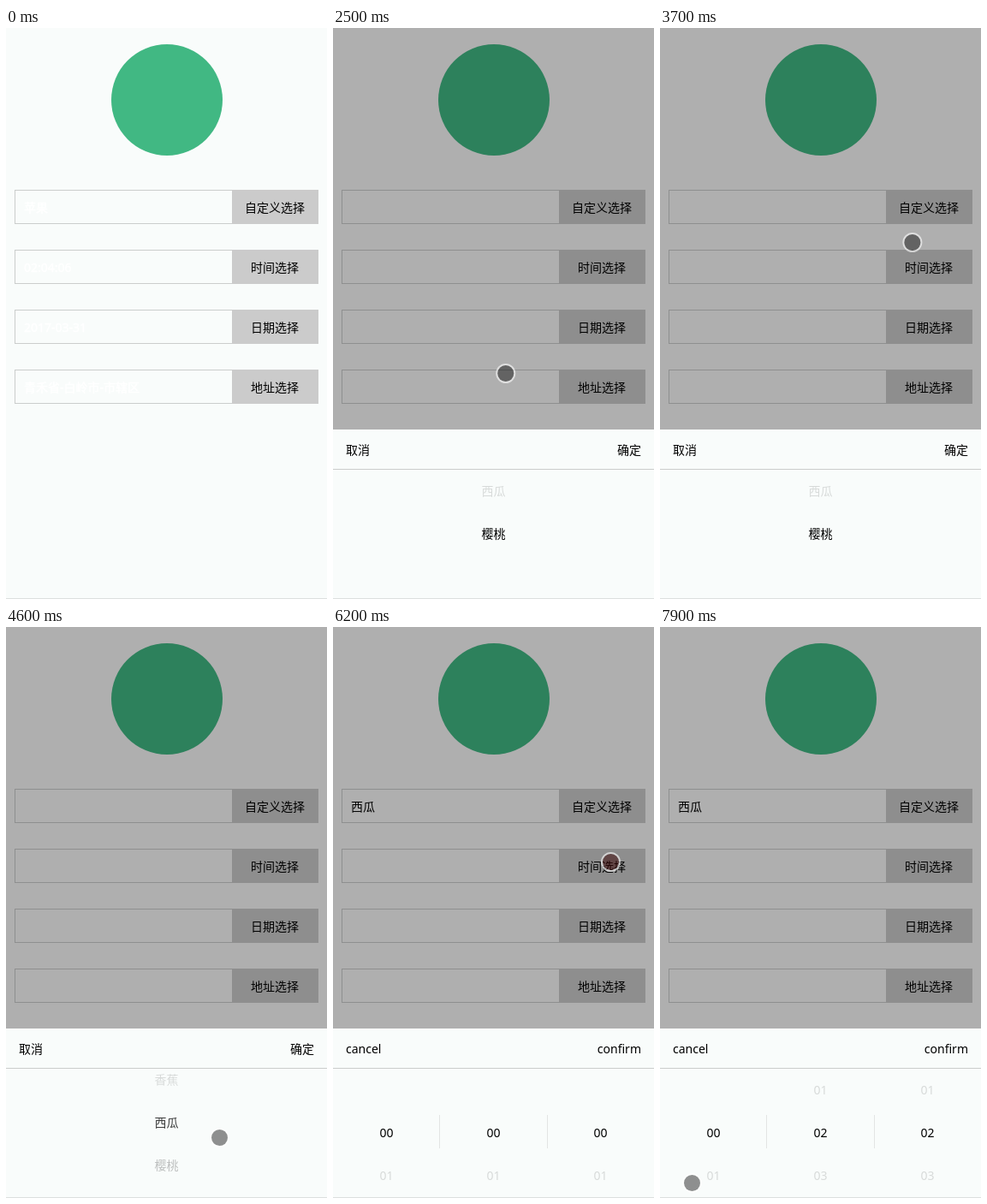
Animation, 375 px wide and 667 px high, one loop 8000 ms. Source, as an HTML page:

```html
<!DOCTYPE html>
<html lang="zh-CN">
<head>
<meta charset="utf-8">
<title>Picker</title>
<style>
  html, body { margin: 0; width: 100%; height: 100%; overflow: hidden; background: #f9fcfb; }
  svg { display: block; width: 375px; height: 667px; }
  text { font: 14px "Noto Sans", "Noto Sans CJK SC", sans-serif; white-space: pre; }
  .mid { text-anchor: middle; }
  .end { text-anchor: end; }
  .old { fill: #fff; stroke: #fff; stroke-width: .5; }
</style>
</head>
<body>
<svg viewBox="0 0 375 667">
  <defs><clipPath id="listArea"><rect y="516" width="375" height="150"/></clipPath></defs>
  <rect width="375" height="667" fill="#f9fcfb"/>
  <rect id="page" width="375" height="469" fill="#fafafa"/>
  <circle cx="188" cy="84" r="65" fill="#41b883"/>
  <g id="rows"></g>
  <g id="popup">
    <rect width="375" height="469" opacity=".3"/>
    <rect y="469" width="375" height="198" fill="#f9fcfb"/>
    <rect y="515" width="375" height="1" fill="#cbcdcc"/>
    <text id="cancel" x="15" y="498"></text>
    <text id="confirm" x="360" y="498" class="end"></text>
    <g id="fruitPicker" clip-path="url(#listArea)"></g>
    <g id="timePicker" clip-path="url(#listArea)">
      <path d="M124.5 570V609M250.5 570V609" stroke="#e3e5e4"/>
    </g>
  </g>
  <rect y="666" width="375" height="1" fill="#dcdfde"/>
  <g id="cursor">
    <circle cx=".5" cy=".5" r="10.5" fill="none" stroke="#fff" stroke-opacity=".6" stroke-width="2"/>
    <circle id="dot" cx=".5" cy=".5" r="9.5"/>
  </g>
</svg>
<script>
const LOOP = 8000, STEP = 100, ITEM = 50, SNAP = 200;
const FRUIT_OPEN = 1300, FRUIT_CLOSE = 3000, FRUIT_REOPEN = 3600, FRUIT_DONE = 5500, TIME_OPEN = 6200;
const $ = id => document.getElementById(id);
const lerp = (a, b, p) => a + (b - a) * p;
const clamp = p => Math.min(1, Math.max(0, p));
const within = (t, from, to) => t >= from && t < to;
const toggle = (id, on) => { $(id).style.display = on ? '' : 'none'; };

function add(parent, tag, attrs, text = '') {
  const el = document.createElementNS('http://www.w3.org/2000/svg', tag);
  for (const name in attrs) el.setAttribute(name, attrs[name]);
  el.textContent = text;
  return parent.appendChild(el);
}

// Where the pointer stops: it glides from one stop to the next.
const stops = [
  { arrive: 500, x: 310, y: 187 },
  { arrive: 900, leave: 1400, x: 293, y: 217 },
  { arrive: 1900, x: 205, y: 628 },
  { arrive: 2700, leave: 2900, x: 200, y: 328 },
  { arrive: 3300, leave: FRUIT_REOPEN, x: 299, y: 206 },
  { arrive: 4400, x: 262, y: 558 },
  { arrive: 4600, x: 249, y: 596 },
  { arrive: FRUIT_DONE, x: 348, y: 473 },
  { arrive: 6000, leave: TIME_OPEN, x: 324, y: 274 },
  { arrive: 6600, leave: 6800, x: 311, y: 632 },
  { arrive: 7100, x: 309, y: 532 },
  { arrive: 7400, x: 218, y: 645 },
  { arrive: 7600, x: 216, y: 545 },
  { arrive: 7900, x: 37, y: 649 }
];
function pointer(t) {
  const i = Math.max(0, stops.findLastIndex(s => s.arrive <= t));
  const a = stops[i], b = stops[i + 1] || a;
  const leave = a.leave || a.arrive;
  const p = clamp((t - leave) / (b.arrive - leave || 1));
  return { x: lerp(a.x, b.x, p), y: lerp(a.y, b.y, p) };
}

// A dragged list follows the pointer, then settles on the nearest item.
function scrollAt(t, drags) {
  let scroll = 0;
  for (const { from, to } of drags) {
    if (t < from) break;
    scroll += pointer(from).y - pointer(Math.min(t, to)).y;
    scroll = lerp(scroll, Math.round(scroll / ITEM) * ITEM, clamp((t - to) / SNAP));
  }
  return scroll;
}
function column(picker, x, items, ...drags) {
  const texts = items.map(s => add($(picker), 'text', { x, class: 'mid' }, s));
  return t => texts.forEach((el, i) => {
    const offset = i * ITEM - scrollAt(t, drags);
    el.setAttribute('y', 596 + offset);
    el.setAttribute('opacity', Math.max(.13, 1 - Math.abs(offset) / ITEM));
  });
}
const numbers = Array.from({ length: 60 }, (_, i) => String(i).padStart(2, '0'));
const columns = [
  column('fruitPicker', 187.5, ['苹果', '香蕉', '西瓜', '樱桃'],
    { from: 1900, to: 2300 }, { from: 4400, to: 4600 }),
  column('timePicker', 62.5, numbers.slice(0, 24)),
  column('timePicker', 187.5, numbers, { from: 7400, to: 7600 }),
  column('timePicker', 312.5, numbers, { from: 6800, to: 7100 })
];

const rows = [
  ['自定义选择', '苹果'],
  ['时间选择', '02:04:06'],
  ['日期选择', '2017-03-31'],
  ['地址选择', '青禾省-白岭市-市辖区']
];
const fields = rows.map(([label], i) => {
  const y = 189 + i * 70;
  add($('rows'), 'rect', { x: 10.5, y: y + .5, width: 260, height: 39, fill: 'none', stroke: '#cbcdcc' });
  add($('rows'), 'rect', { x: 264, y, width: 101, height: 40, fill: '#cbcbcb' });
  add($('rows'), 'text', { x: 314, y: y + 26, class: 'mid' }, label);
  return add($('rows'), 'text', { x: 21, y: y + 26 });
});

function draw(t) {
  const fresh = t < FRUIT_OPEN, timeOpen = t >= TIME_OPEN;
  toggle('page', !fresh);
  toggle('popup', timeOpen || within(t, FRUIT_OPEN, FRUIT_CLOSE) || within(t, FRUIT_REOPEN, FRUIT_DONE));
  toggle('fruitPicker', !timeOpen);
  toggle('timePicker', timeOpen);
  $('cancel').textContent = timeOpen ? 'cancel' : '取消';
  $('confirm').textContent = timeOpen ? 'confirm' : '确定';

  fields.forEach((el, i) => {
    const chosen = i === 0 && t >= FRUIT_DONE;
    el.textContent = fresh ? rows[i][1] : chosen ? '西瓜' : '';
    el.setAttribute('class', fresh ? 'old' : '');
  });
  columns.forEach(update => update(t));

  const { x, y } = pointer(t);
  const pressed = [FRUIT_OPEN, FRUIT_REOPEN, TIME_OPEN].some(open => within(t, open, open + STEP));
  toggle('cursor', t >= stops[0].arrive);
  $('cursor').setAttribute('transform', `translate(${x} ${y})`);
  $('dot').setAttribute('fill', pressed ? 'rgba(60,10,10,.55)' : 'rgba(0,0,0,.43)');
}

const start = performance.now();
function frame() {
  const t = (performance.now() - start) % LOOP;
  draw(Math.floor(t / STEP) * STEP);
  requestAnimationFrame(frame);
}
frame();
</script>
</body>
</html>
```
